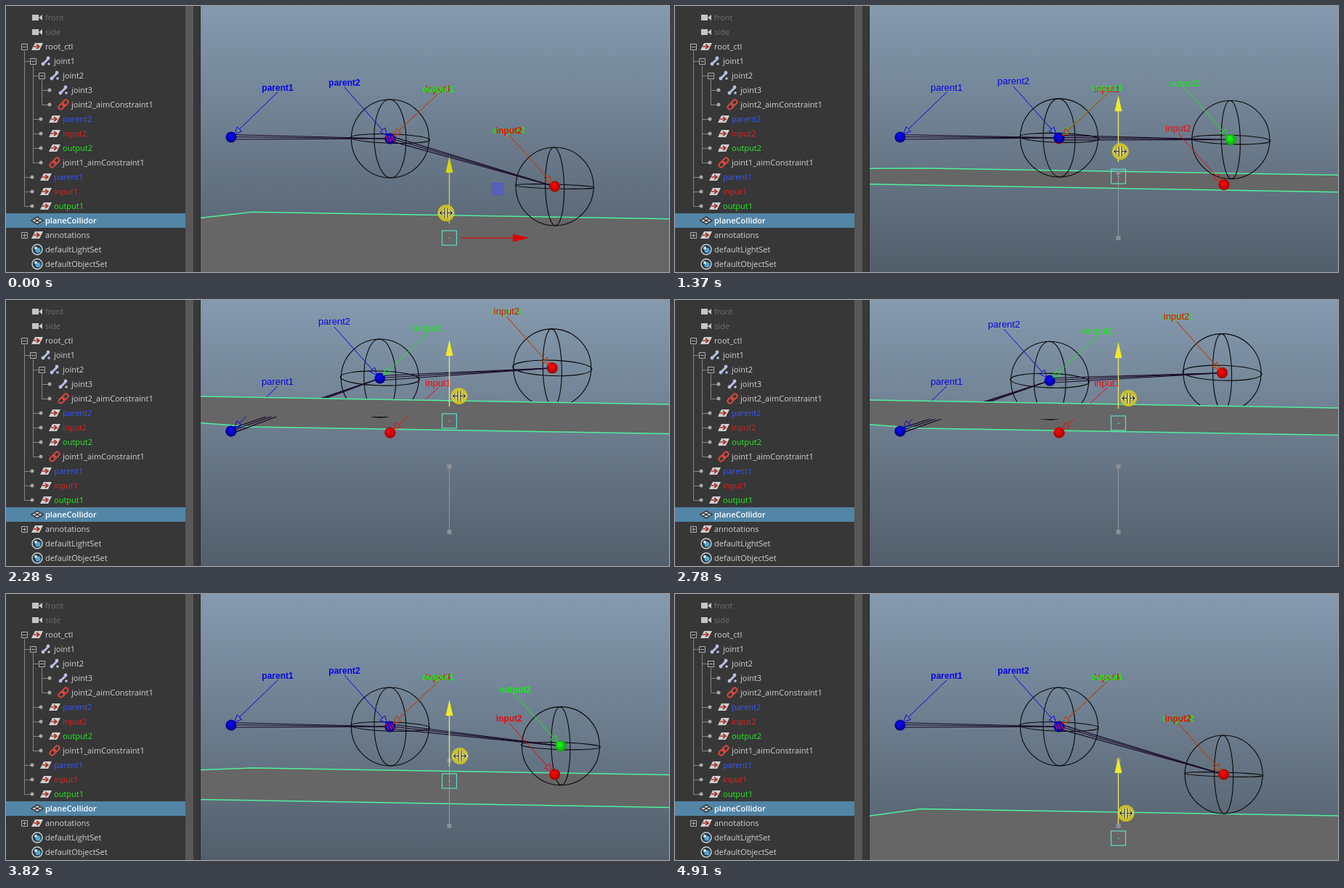
Write an HTML page with a canvas that moves like this. It is 913 by 367 pixels and loops after 4.94 s.

```html
<!DOCTYPE html>
<html lang="en">
<head>
<meta charset="utf-8">
<title>Plane collider rig</title>
<style>
  html, body { margin: 0; width: 100%; height: 100%; overflow: hidden; background: #373737; }
  canvas, svg { position: absolute; left: 0; top: 0; display: block; }
  svg text { font: 11px "Open Sans", "Noto Sans", sans-serif; }
</style>
</head>
<body>
<canvas id="view" width="913" height="367"></canvas>
<svg id="tree" width="268" height="367" viewBox="0 0 268 367"></svg>
<script>
// ---- Outliner ----
const LIGHT = '#d2d2d2', DIM = '#707070', BLUE = '#3458ff', RED = '#e8201c', GREEN = '#20f020';

// text, indent level, icon, colour, marker
const rows = [
  ['front', 0, 'cam', DIM], ['side', 0, 'cam', DIM],
  ['root_ctl', 0, 'xform', LIGHT, 'minus'],
  ['joint1', 1, 'joint', LIGHT, 'minus'],
  ['joint2', 2, 'joint', LIGHT, 'minus'],
  ['joint3', 3, 'joint', LIGHT, 'dot'],
  ['joint2_aimConstraint1', 3, 'link', LIGHT, 'dot'],
  ['parent2', 2, 'xform', BLUE, 'dot'], ['input2', 2, 'xform', RED, 'dot'], ['output2', 2, 'xform', GREEN, 'dot'],
  ['joint1_aimConstraint1', 2, 'link', LIGHT, 'dot'],
  ['parent1', 1, 'xform', BLUE, 'dot'], ['input1', 1, 'xform', RED, 'dot'], ['output1', 1, 'xform', GREEN, 'dot'],
  ['planeCollidor', 0, 'mesh', '#fff'],
  ['annotations', 0, 'xform', LIGHT, 'plus'],
  ['defaultLightSet', 0, 'set', LIGHT], ['defaultObjectSet', 0, 'set', LIGHT]
];

const icons = {
  cam: '<path d="M-7-4H2V4H-7ZM2 0 7-4V4Z" fill="#c4c4c4"/>',
  xform: '<path d="M-3-5H8L3 5H-8Z" fill="#d0d0d0"/><path d="M-5 0H2M-1-3 3 0-1 3" fill="none" stroke="#a83228" stroke-width="1.6"/>',
  joint: '<path d="M-4 4 4-4" stroke="#b8bfe0" stroke-width="3"/><circle cx="-4" cy="4" r="2.4" fill="#b8bfe0"/><circle cx="3" cy="-4" r="2.4" fill="#b8bfe0"/><circle cx="4" cy="4" r="1.8" fill="#b8bfe0"/>',
  link: '<g transform="rotate(-45)" fill="none" stroke="#d8483c" stroke-width="2"><rect x="-8" y="-3" width="9" height="6" rx="3"/><rect x="-1" y="-3" width="9" height="6" rx="3"/></g>',
  mesh: '<path d="M-8 0 0-5 8 0 0 5ZM-4-2.5 4 2.5M4-2.5-4 2.5" fill="#c8c8c8" stroke="#222" stroke-width="1.2"/>',
  set: '<circle r="7" fill="#2c3a42" stroke="#c8d0d4" stroke-width="1.5"/><circle cx="1" cy="1" r="3.6" fill="#4fa8d8"/><circle cx="-2" cy="-2" r="2" fill="#d8e8f0"/>'
};

const rowY = i => 16 + 20 * i;

function marker(kind, x, y) {
  if (kind === 'dot') return `<circle cx="${x - 1}" cy="${y}" r="2.5" fill="#a8a8a8"/>`;
  const bar = kind === 'plus' ? `M${x + .5} ${y - 2}v5` : '';
  return `<path d="M${x - 3.5} ${y - 3.5}h8v8h-8ZM${x - 2} ${y + .5}h5${bar}" fill="#373737" stroke="#b0b0b0"/>`;
}

function buildTree() {
  let out = `<rect width="247" height="367" fill="#373737"/><rect x="247" width="11" height="367" fill="#585858"/>
    <rect x="258" width="9" height="367" fill="#383838"/><rect x="267" width="1" height="367" fill="#262626"/>
    <rect y="286" width="247" height="20" fill="#5285a6"/>
    <path d="M25.5 62V276M37.5 82V216M49.5 102V136" stroke="#858585"/>`;
  rows.forEach(([text, level, icon, color, mark], i) => {
    const x = 43 + 12 * level, y = rowY(i), mx = 25 + 12 * level;
    if (mark && level) out += `<path d="M${mx - 12} ${y + .5}H${mx}" stroke="#858585"/>`;
    if (mark) out += marker(mark, mx, y);
    const weight = icon === 'mesh' ? ' style="font-weight:600"' : '';
    out += `<g transform="translate(${x} ${y})">${icons[icon]}</g>
      <text x="${x + 11}" y="${y + 4}" fill="${color}"${weight}>${text}</text>`;
  });
  document.getElementById('tree').innerHTML = out;
}

// ---- Motion ----
const LOOP = 4940, DRAG = 90;
const heightKeys = [[0, 320], [89, 320], [90, 318], [610, 292], [900, 272], [1140, 254], [1680, 210],
  [1790, 203], [2230, 171], [2280, 167], [2400, 160], [2650, 160], [2660, 161], [3160, 198],
  [3690, 247.5], [3820, 258], [4240, 286], [4770, 320], [4910, 337]];
const cursorKeys = [[0, 606], [900, 608], [1790, 618], [2280, 624], [3160, 625], [3820, 625], [4910, 621]];

function sample(keys, t) {
  const i = keys.findIndex(k => k[0] > t);
  if (i < 0) return keys[keys.length - 1][1];
  const [t0, a] = keys[i - 1], [t1, b] = keys[i];
  return a + (b - a) * (t - t0) / (t1 - t0);
}

// Rig solution for a plane height p
function solve(p) {
  const lift = Math.min(0, p - 236.2);
  const y1 = 183 + 1.083 * lift;
  const out1 = [529 - .0025 * (183 - y1) ** 2, y1];
  const inY = 249 + 2.24 * lift;
  const in2 = [310 + Math.sqrt(450.8 ** 2 - (inY - 181) ** 2), inY];
  const y2 = Math.min(inY, 225 + 1.1 * (p - 272));
  const out2 = y2 === inY ? in2 : [out1[0] + Math.sqrt(236.4 ** 2 - (y2 - y1) ** 2), y2];
  return { out1, in2, out2, contact: 237 + 1.083 * (p - 236.2) };
}

// ---- Viewport ----
const ctx = document.getElementById('view').getContext('2d');
const B = '#0505e6', R = '#f00808', G = '#14ee14';
const root = [310, 181], in1 = [529, 183];

function line(pts, color, width = 1, close = false) {
  ctx.beginPath();
  pts.forEach(([x, y]) => ctx.lineTo(x, y));
  if (close) ctx.closePath();
  ctx.strokeStyle = color;
  ctx.lineWidth = width;
  ctx.stroke();
}

function shape(pts, color) {
  ctx.beginPath();
  pts.forEach(([x, y]) => ctx.lineTo(x, y));
  ctx.fillStyle = color;
  ctx.fill();
}

function oval(x, y, rx, ry, turn = 0) {
  ctx.beginPath();
  ctx.ellipse(x, y, rx, ry, turn, 0, 7);
  ctx.strokeStyle = '#080808';
  ctx.lineWidth = 1.1;
  ctx.stroke();
}

function wireSphere([x, y], rx) {
  oval(x, y, 53.5, 54);
  oval(x, y, rx, 54, -.02);
  oval(x, y, 54.5, 3 + (248 - y) * .05, .03);
}

function ball([x, y], light, dark) {
  const g = ctx.createRadialGradient(x - 1.5, y - 2, 2, x, y, 8);
  g.addColorStop(0, light);
  g.addColorStop(1, dark);
  ctx.beginPath();
  ctx.arc(x, y, 7.5, 0, 7);
  ctx.fillStyle = g;
  ctx.fill();
}
const blueBall = at => ball(at, '#0808f4', '#000078');
const redBall = at => ball(at, '#f40808', '#a00000');
const greenBall = at => ball(at, '#18f018', '#0a9a0a');

function bone([ax, ay], [bx, by]) {
  const d = Math.hypot(bx - ax, by - ay), nx = (ay - by) / d, ny = (bx - ax) / d;
  for (const o of [-3.5, -.5, 3])
    line([[ax + nx * o, ay + ny * o], [bx, by]], '#180a28', 1.2);
}

// Leader with an open arrowhead; (dx, dy) runs from the ball to the text centre
function leader([x, y], dx, dy, color) {
  const d = Math.hypot(dx, dy + 7), ux = dx / d, uy = (dy + 7) / d;
  const tx = x + ux * 6, ty = y + uy * 6, bx = tx + ux * 10, by = ty + uy * 10;
  line([[x + dx, y + dy + 7], [bx, by]], color);
  line([[tx, ty], [bx - uy * 4.5, by + ux * 4.5], [bx + uy * 4.5, by - ux * 4.5]], color, 1, true);
}

function label(text, [x, y], dx, dy, color) {
  ctx.fillStyle = color;
  ctx.fillText(text, x + dx, y + dy + 4.5);
}

function drawRig({ out1, in2, out2 }, p) {
  const rest = p >= 236.2;
  wireSphere(out1, 22);
  wireSphere(out2, 13);
  bone(root, out1);
  bone(out1, out2);
  greenBall(out2);
  redBall(in2);
  redBall(in1);
  blueBall(out1);
  if (rest) {
    const [x, y] = out1;
    for (const o of [-4, 0, 4]) line([[x + o - 2, y - 4], [x + o + 2, y + 4]], '#d0103c', 1.4);
  }
  blueBall(root);

  leader(root, 64, -69, B);
  leader(out1, -63, -78, B);
  leader(out1, 66, -69, G);
  leader(in1, 66, -69, R);
  leader(out2, -63, -78, G);
  leader(in2, -63, -78, R);

  ctx.font = (rest ? 'bold 12px' : '13px') + ' "Liberation Sans", Arial, sans-serif';
  ctx.textAlign = 'center';
  label('parent1', root, 64, -69, B);
  label('parent2', out1, -63, -78, B);
  label('input1', in1, 66, -69, R);
  label('output1', out1, 66, -69, G);
  label('output2', out2, -63, -78, G);
  label('input2', in2, -63, -78, R);
}

function drawPlane(p) {
  const back = 240 + .715 * (p - 258), near = 306.5 + 1.652 * (p - 272);
  const far = [[267, back + .09 * (p - 228)], [339, back], [914, back + 9.5]];
  const front = [[914, near + 11], [267, near]];
  shape([...far, ...front], '#666666');
  line(far, '#50f0a0', 1.5);
  line(front, '#50f0a0', 1.5);
}

function drawManip(p, dragging) {
  const x = 610.5, tip = p - 112;
  if (dragging) {
    line([[x, 230], [x, 320]], '#9298a0');
    ctx.fillStyle = '#8a9096';
    ctx.fillRect(607.5, 226.5, 6, 6);
    ctx.fillRect(607.5, 317, 6, 6);
  } else {
    line([[628, 320], [699, 320]], '#d01414', 1.3);
    shape([[698, 314.5], [720, 320], [698, 325.5]], '#e00000');
    ctx.fillStyle = 'rgba(82,88,220,.6)';
    ctx.fillRect(668, 244, 17, 17);
    ctx.strokeStyle = '#5055d0';
    ctx.lineWidth = 1;
    ctx.strokeRect(668.5, 244.5, 16, 16);
  }
  const yellow = dragging ? '#f0ea28' : '#dcd414';
  line([[x, tip + 20], [x, p - 20]], dragging ? '#ece860' : yellow, 1.3);
  shape([[x, tip], [x + 5, tip + 22], [x - 5, tip + 22]], yellow);
  ctx.strokeStyle = '#5cdccc';
  ctx.lineWidth = 1.2;
  ctx.strokeRect(600.5, p - 10, 20, 20);
  ctx.fillStyle = '#5cdccc';
  ctx.fillRect(610, p - .5, 1.5, 1.5);
}

function drawCursor(x, y) {
  ctx.beginPath();
  ctx.arc(x, y, 11.5, 0, 7);
  ctx.fillStyle = 'rgba(212,200,32,.88)';
  ctx.fill();
  for (const [color, w] of [['#f4f0c0', 3], ['#2c2a10', 1.2]]) {
    for (const s of [-1, 1]) {
      line([[x + s * 2, y - 7], [x + s * 2, y + 7]], color, w);
      line([[x + s * 2, y], [x + s * 8, y]], color, w);
      line([[x + s * 5.5, y - 3], [x + s * 8.5, y], [x + s * 5.5, y + 3]], color, w);
    }
  }
}

const sky = ctx.createLinearGradient(0, 0, 0, 367);
sky.addColorStop(0, '#859aaf');
sky.addColorStop(1, '#525e6b');

function draw(t) {
  const p = sample(heightKeys, t), pose = solve(p);
  ctx.fillStyle = sky;
  ctx.fillRect(0, 0, 913, 367);
  if (p > 211) {
    drawPlane(p);
    drawRig(pose, p);
  } else {
    // Seen from below: the plane hides whatever lies above it
    drawRig(pose, p);
    drawPlane(p);
    ctx.save();
    ctx.beginPath();
    ctx.rect(268, pose.contact - 1, 645, 367);
    ctx.clip();
    drawRig(pose, p);
    ctx.restore();
  }
  drawManip(p, t >= DRAG);
  drawCursor(sample(cursorKeys, t), p - 34.5);
}

buildTree();
const start = performance.now();
function tick() {
  draw((performance.now() - start) % LOOP);
  requestAnimationFrame(tick);
}
tick();
</script>
</body>
</html>
```
